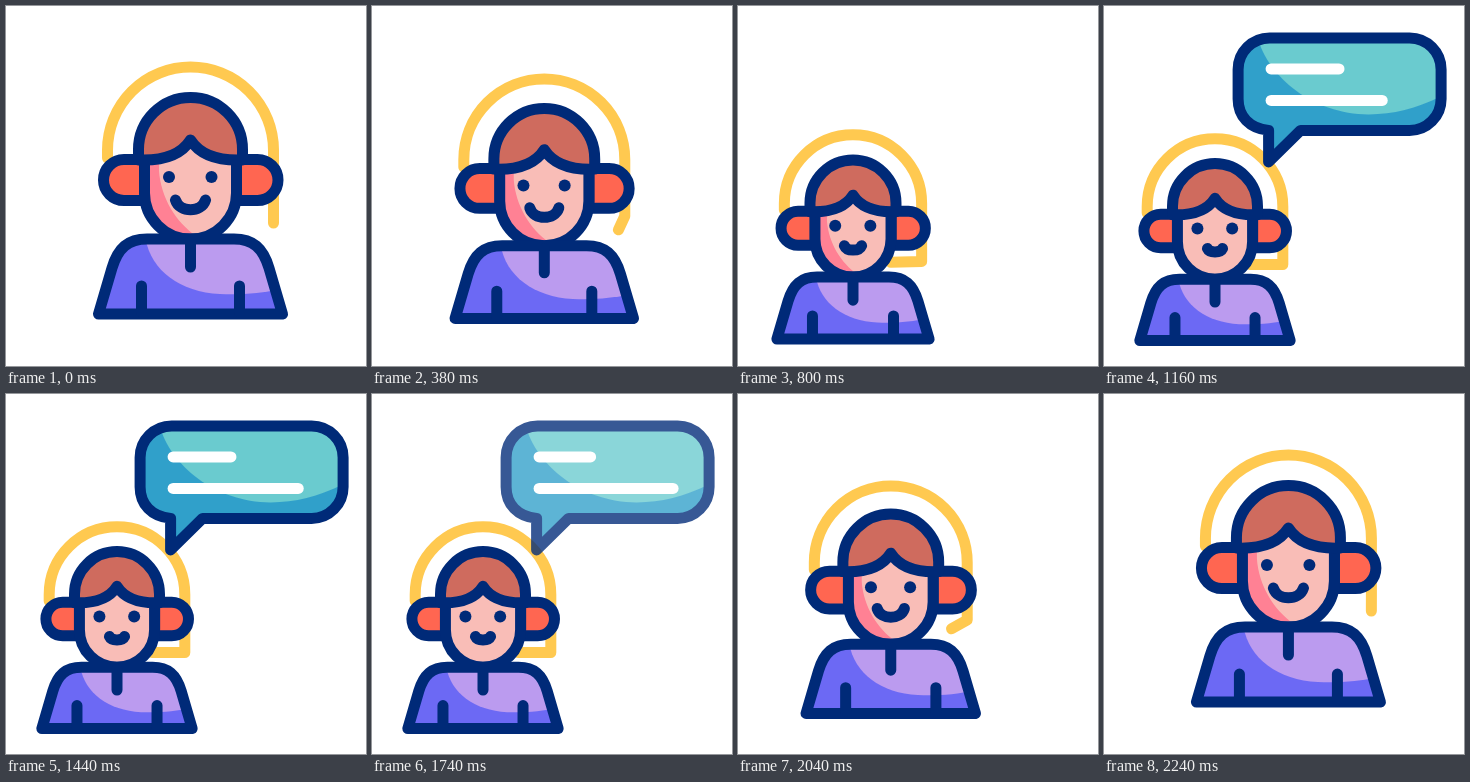
These frames come from a looping animation (360 px wide and 360 px high, 2.4 s). An HTML page with a canvas:

```html
<!DOCTYPE html>
<html lang="en">
<head>
<meta charset="utf-8">
<title>Support agent</title>
<style>
html, body { margin: 0; width: 100%; height: 100%; overflow: hidden; background: #fff; }
canvas { display: block; width: 360px; height: 360px; }
</style>
</head>
<body>
<canvas id="stage"></canvas>
<script>
const LOOP = 2400;
const NAVY = '#002a78', GOLD = '#ffc950';
const LINE = 11;

const dpr = window.devicePixelRatio || 1;
const stage = document.getElementById('stage');
const layer = document.createElement('canvas');
for (const c of [stage, layer]) {
  c.width = c.height = 360 * dpr;
  c.getContext('2d').scale(dpr, dpr);
}
const main = stage.getContext('2d');
const overlay = layer.getContext('2d');
let ctx = main;
let zoom = 1; // line weights stay constant while the figure scales

const clamp = v => Math.min(1, Math.max(0, v));
const span = (t, a, b) => clamp((t - a) / (b - a));
const ease = u => u * u * (3 - 2 * u);
const mix = (a, b, u) => a + (b - a) * u;

function stroke(path, color = NAVY) {
  ctx.strokeStyle = color;
  ctx.lineWidth = LINE / zoom;
  ctx.lineCap = ctx.lineJoin = 'round';
  ctx.stroke(path);
}

function fill(path, color) {
  ctx.fillStyle = color;
  ctx.fill(path);
}

// Fills a shape, then a second tone clipped to it, then outlines it.
function toned(shape, base, tone, color, alpha = 1) {
  fill(shape, base);
  ctx.save();
  ctx.clip(shape);
  ctx.globalAlpha = alpha;
  fill(tone, color);
  ctx.restore();
  stroke(shape);
}

const earL = new Path2D('M139 153.5H118a20.5 20.5 0 0 0 0 41H139Z');
const earR = new Path2D('M230.5 153.5H251.5a20.5 20.5 0 0 1 0 41H230.5Z');
const face = new Path2D('M138.5 135V187a46 46 0 0 0 92 0V135');
const faceShade = new Path2D('M130 130H153V165C155 192 170 216 190 230V240H130Z');
const hair = new Path2D('M132.5 154V143.5a52 52 0 0 1 104 0V154' +
  'C212 155 194 149 184.5 134C175 149 157 155 132.5 154Z');
const body = new Path2D('M92.5 308L106 262C112 242 122 233 141 233H228' +
  'C247 233 257 242 263 262L276.5 308Z');
const bodyLight = new Path2D('M139 228C142 262 172 286 214 288C238 289 258 287 285 281V228Z');
const seams = new Path2D('M184.5 236V261M135.5 280V306M233.5 280V306');

const bubble = new Path2D('M166 31.5H306a31.5 31.5 0 0 1 31.5 31.5V92.5' +
  'a31.5 31.5 0 0 1 -31.5 31.5H197L165 155.5V124' +
  'C146 122 134.5 110 134.5 92.5V63a31.5 31.5 0 0 1 31.5 -31.5Z');
const bubbleLight = new Path2D('M153 26C160 66 206 108 265 108C292 108 315 102 345 86V26Z');

function eye(x) {
  const p = new Path2D();
  p.arc(x, 171, 6 / zoom, 0, 7);
  fill(p, NAVY);
}

// Headband whose right end folds into a microphone arm.
function headband(p) {
  const arm = new Path2D('M101.5 152V144a83 83 0 0 1 166 0');
  arm.lineTo(267.5, mix(200, 215, p));
  arm.lineTo(mix(267.5, 228, p), mix(217, 215, p));
  stroke(arm, GOLD);
}

function mouth(p) {
  const k = p ** 4, w = mix(15, 9.2, k);
  const y = mix(194, 195.4, k), c = mix(207, 201, k);
  const m = new Path2D();
  m.moveTo(184.5 - w, y);
  m.bezierCurveTo(184.5 - w * 0.73, c, 184.5 + w * 0.73, c, 184.5 + w, y);
  stroke(m);
}

function person(p, shade) {
  zoom = mix(1, 0.817, p);
  ctx.save();
  ctx.translate(mix(184.5, 111, p), mix(308, 334.5, p));
  ctx.scale(zoom, zoom);
  ctx.translate(-184.5, -308);
  headband(p);
  for (const ear of [earL, earR]) {
    fill(ear, '#ff6651');
    stroke(ear);
  }
  toned(face, '#f9bdb7', faceShade, '#ff8194', shade);
  fill(hair, '#cf6b5e');
  stroke(hair);
  eye(163);
  eye(205.5);
  mouth(p);
  toned(body, '#6c69f4', bodyLight, '#bb9bef');
  stroke(seams);
  ctx.restore();
  zoom = 1;
}

function textLine(y, end) {
  const p = new Path2D();
  p.moveTo(167.5, y);
  p.lineTo(end, y);
  stroke(p, '#fff');
}

// Drawn on its own layer so that overlapping parts fade as one.
function speech(t, alpha) {
  if (alpha <= 0) return;
  const u = ease(span(t, 900, 1750));
  ctx = overlay;
  ctx.clearRect(0, 0, 360, 360);
  ctx.save();
  ctx.translate(-0.4, 0.4);
  toned(bubble, '#30a0ca', bubbleLight, '#6acbcf');
  textLine(62.5, mix(240.2, 219, u));
  textLine(94, mix(272, 301.5, u));
  ctx.restore();
  ctx = main;
  ctx.globalAlpha = alpha;
  ctx.drawImage(layer, 0, 0, 360, 360);
  ctx.globalAlpha = 1;
}

function draw(t) {
  ctx.fillStyle = '#fff';
  ctx.fillRect(0, 0, 360, 360);
  const p = ease(span(t, 200, 900)) - ease(span(t, 1790, 2250));
  const alpha = span(t, 820, 1000) - span(t, 1700, 1886);
  const shade = 1 - span(t, 860, 960) + span(t, 1740, 1840);
  person(p, shade);
  speech(t, alpha);
}

const start = performance.now();
function tick() {
  draw((performance.now() - start) % LOOP);
  requestAnimationFrame(tick);
}
tick();
</script>
</body>
</html>
```
